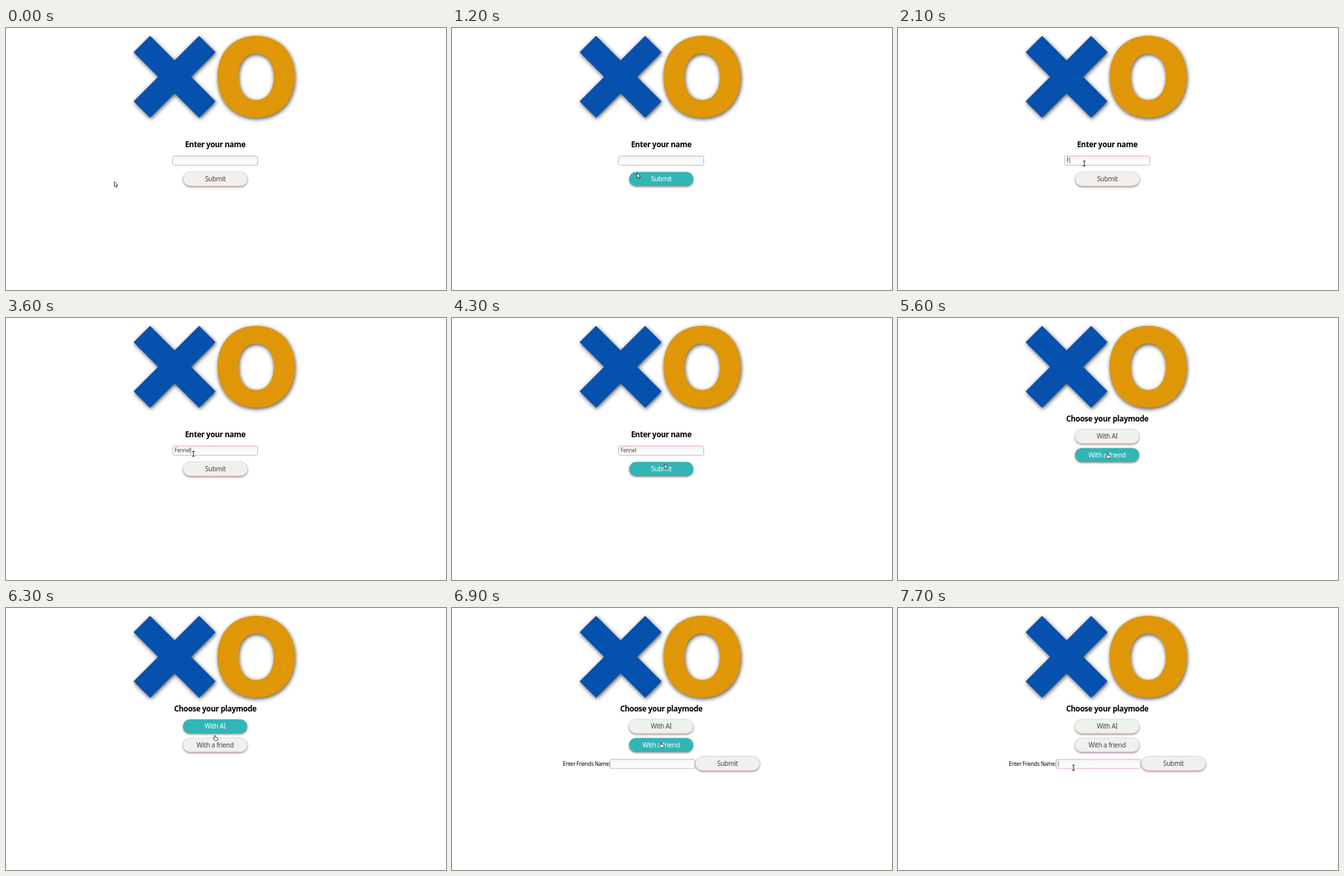
An HTML page for the animation above (8 s loop, 672 by 400 pixels).

```html
<!DOCTYPE html>
<html lang="en">
<head>
<meta charset="utf-8">
<title>XO</title>
<style>
  html, body { margin: 0; width: 100%; height: 100%; overflow: hidden; background: #fff; }
  svg { display: block; width: 100%; height: 100%; }
  text { font-family: "Noto Sans", "Open Sans", sans-serif; font-size: 8px; letter-spacing: -.03em; }
  filter { color-interpolation-filters: sRGB; }
  .title { font-size: 11.7px; font-weight: 700; text-anchor: middle; }
  .label { font-size: 10px; text-anchor: middle; fill: #444; }
  .pill { fill: #f0f0ee; stroke: #e6d8d2; stroke-width: .8; filter: url(#warm); }
  .hover .pill { fill: #33b5b5; stroke: none; filter: url(#grey); }
  .hover .label { fill: #fff; }
  .box { fill: url(#field); stroke: #b9b9b9; }
  .focus .box { stroke: #e0b0a8; }
  .caret { stroke: #555; stroke-width: .8; }
  .pointer { fill: #fff; stroke: #333; stroke-width: .9; stroke-linejoin: round; }
  .off { display: none; }
</style>
</head>
<body>
<svg viewBox="0 0 672 400">
  <defs>
    <filter id="logoShadow" x="-20%" y="-20%" width="140%" height="140%">
      <feDropShadow dx="1" dy="2" stdDeviation="3" flood-color="#000" flood-opacity=".7"/>
    </filter>
    <filter id="warm" x="-10%" y="-30%" width="120%" height="180%">
      <feDropShadow dx="0" dy="1.5" stdDeviation="1.5" flood-color="#70483e" flood-opacity=".65"/>
    </filter>
    <filter id="grey" x="-10%" y="-30%" width="120%" height="180%">
      <feDropShadow dx="0" dy="1.5" stdDeviation="1.6" flood-color="#3c3030" flood-opacity=".65"/>
    </filter>
    <linearGradient id="field" x2="0" y2="1">
      <stop offset="0" stop-color="#f3f3f3"/>
      <stop offset=".7" stop-color="#fdfdfd"/>
    </linearGradient>
  </defs>

  <g filter="url(#logoShadow)">
    <path stroke="#0650ae" stroke-width="35.4" d="M207.5 24.5l100 100M307.5 24.5l-100 100"/>
    <path id="ring" fill="#df9708" fill-rule="evenodd"/>
  </g>

  <g id="login">
    <text class="title" x="319.6" y="182.2">Enter your name</text>
    <g id="nameField">
      <rect class="box" x="254.5" y="195.5" width="130" height="14" rx="2"/>
      <text id="typed" x="257.6" y="205.3" fill="#444"></text>
      <path id="nameCaret" class="caret"/>
    </g>
    <g id="submit"></g>
  </g>

  <g id="modes">
    <text class="title" x="319.6" y="158">Choose your playmode</text>
    <g id="ai"></g>
    <g id="friend"></g>
    <g id="friendRow">
      <text x="169.3" y="240.8">Enter Friends Name:</text>
      <g id="friendField">
        <rect class="box" x="241.5" y="231" width="129.5" height="14" rx="2"/>
        <path id="friendCaret" class="caret" d="M245 233.5v9"/>
      </g>
      <g id="submitFriend"></g>
    </g>
  </g>

  <g id="cursor">
    <path id="arrow" class="pointer" d="M.4.4V8.2L2.2 6.6 3.4 9.5 4.8 8.9 3.6 6.1H6Z"/>
    <path id="hand" class="pointer" d="M-.8 5V1Q0-.5.8 1V3.2L4 3.9Q5 4.2 4.8 5.2L4.1 8.2H-.2L-2.8 5.2Q-2.5 4-.8 5Z"/>
    <path id="beam" fill="none" stroke="#333" stroke-width="1.1" d="M-2-3.8H2M0-3.8V3.8M-2 3.8H2"/>
  </g>
</svg>

<script>
const LOOP = 8000, TICK = 100;
const HOVER_LAG = 50;
const NAME = 'Fennel', TYPE_START = 2100, TYPE_STEP = 200;
const MODES_AT = 4400, ROW_AT = 6900;

const $ = id => document.getElementById(id);
const show = (id, on) => $(id).classList.toggle('off', !on);

// Rounded oval, slightly squarer than an ellipse.
function oval(cx, cy, rx, ry, k = .6) {
  const a = rx * k, b = ry * k;
  return `M${cx} ${cy - ry}C${cx + a} ${cy - ry} ${cx + rx} ${cy - b} ${cx + rx} ${cy}` +
    `S${cx + a} ${cy + ry} ${cx} ${cy + ry}S${cx - rx} ${cy + b} ${cx - rx} ${cy}` +
    `S${cx - a} ${cy - ry} ${cx} ${cy - ry}Z`;
}
$('ring').setAttribute('d', oval(382, 74.5, 59, 62.5) + oval(382, 74.5, 27, 35.5));

function button(id, label, cx, cy) {
  $(id).innerHTML =
    `<rect class="pill" x="${cx - 49}" y="${cy - 10.6}" width="98" height="21.2" rx="10.6"/>` +
    `<text class="label" x="${cx}" y="${cy + 3.7}">${label}</text>`;
}
button('submit', 'Submit', 319.7, 230.4);
button('ai', 'With AI', 319.4, 180.7);
button('friend', 'With a friend', 319.4, 209);
button('submitFriend', 'Submit', 420.8, 237.3);

// The pointer rests between these moves.
const HOME = { x: 165, y: 234 };
const MOVES = [
  { start: 400, end: 1200, x: 282, y: 221 },
  { start: 1200, end: 1400, x: 284.5, y: 206.8 },
  { start: 3500, end: 4300, x: 324, y: 222 },
  { start: 5050, end: 5600, x: 320, y: 206 },
  { start: 5800, end: 6000, x: 319, y: 183 },
  { start: 6100, end: 6500, x: 319, y: 205 },
  { start: 7100, end: 7500, x: 268, y: 243.8 }
];
const CURSORS = { nameField: 'beam', friendField: 'beam', submit: 'arrow', ai: 'hand', friend: 'hand' };

function pointAt(t) {
  return MOVES.reduce((p, m) => {
    const u = Math.min(1, Math.max(0, (t - m.start) / (m.end - m.start)));
    const e = u * u * (3 - 2 * u);
    return { x: p.x + (m.x - p.x) * e, y: p.y + (m.y - p.y) * e };
  }, HOME);
}

function contains(id, { x, y }) {
  const r = $(id).firstElementChild.getBBox();
  return x >= r.x && x <= r.x + r.width && y >= r.y && y <= r.y + r.height;
}

// The control under the pointer, among those on screen.
function targetAt(t) {
  const visible = t < MODES_AT ? ['nameField', 'submit']
    : t < ROW_AT ? ['ai', 'friend'] : ['ai', 'friend', 'friendField'];
  const point = pointAt(t - HOVER_LAG);
  return visible.find(id => contains(id, point));
}

function draw(t) {
  show('login', t < MODES_AT);
  show('modes', t >= MODES_AT);
  show('friendRow', t >= ROW_AT);

  const count = Math.max(0, Math.floor((t - TYPE_START) / TYPE_STEP) + 1);
  $('typed').textContent = NAME.slice(0, count);
  $('nameField').classList.toggle('focus', t >= 1600);
  show('nameCaret', t >= 1600 && t < 3700);
  const caretX = 258.3 + (count ? $('typed').getComputedTextLength() : 0);
  $('nameCaret').setAttribute('d', `M${caretX} 198v9`);

  $('friendField').classList.toggle('focus', t >= 7700);
  show('friendCaret', t >= 7700);

  const target = targetAt(t);
  for (const id of ['submit', 'ai', 'friend']) $(id).classList.toggle('hover', id === target);
  for (const id of ['arrow', 'hand', 'beam']) show(id, id === (CURSORS[target] || 'arrow'));
  const { x, y } = pointAt(t);
  $('cursor').setAttribute('transform', `translate(${x} ${y})`);
}

const start = performance.now();
function frame() {
  const t = (performance.now() - start) % LOOP;
  draw(Math.floor(t / TICK) * TICK);
  requestAnimationFrame(frame);
}
frame();
</script>
</body>
</html>
```
